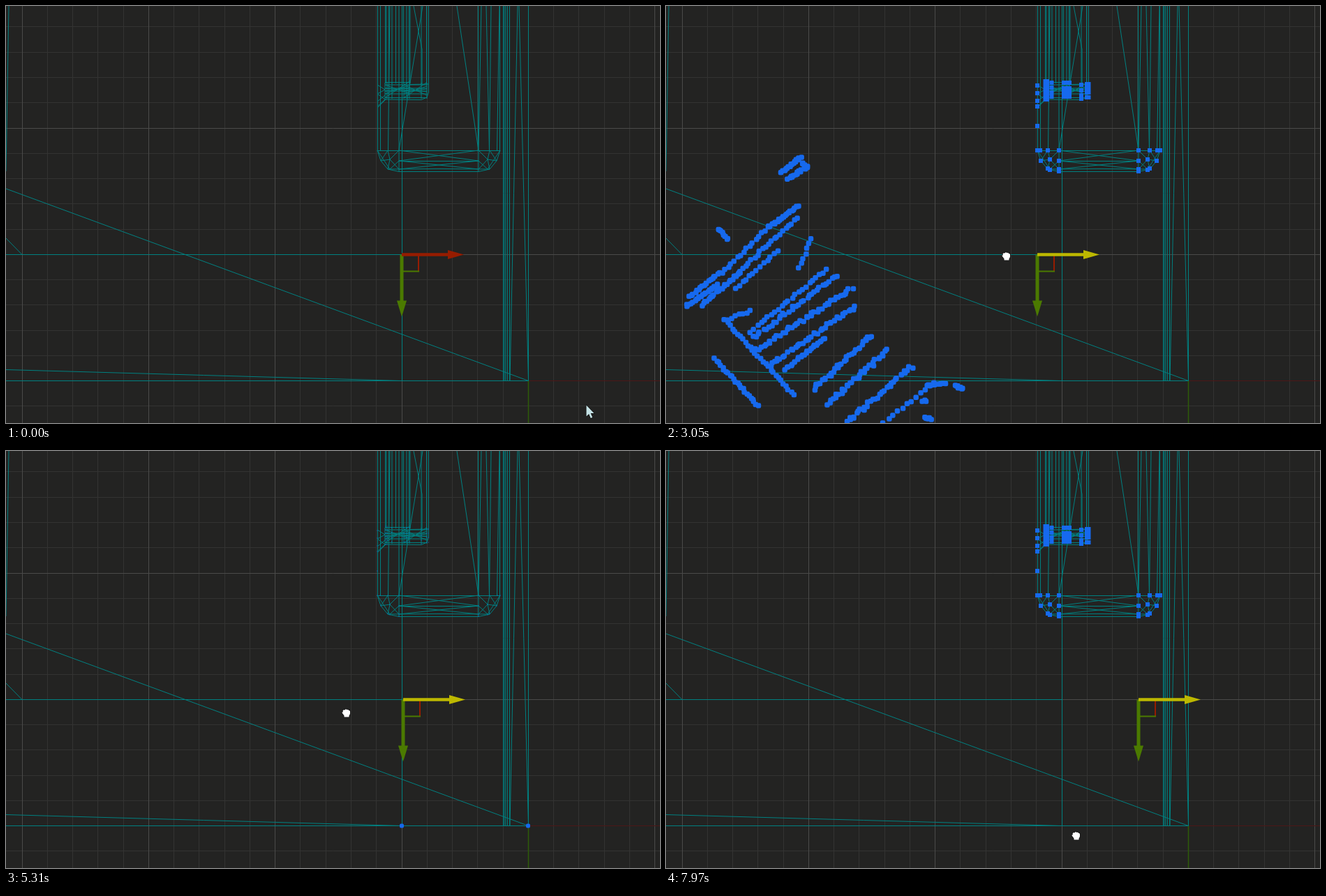
These frames come from a looping animation (937 by 598 pixels, 8 s). An HTML page with a canvas:

```html
<!DOCTYPE html>
<html lang="en">
<head>
<meta charset="utf-8">
<title>Vertex snapping</title>
<style>
  html, body { margin: 0; width: 100%; height: 100%; overflow: hidden; background: #232322; }
  canvas { display: block; }
</style>
</head>
<body>
<canvas id="stage" width="937" height="598"></canvas>
<script>
const ctx = document.getElementById('stage').getContext('2d');
const LOOP = 8000, STEP = 80, SHRINK = 270;
const TEAL = '#008080', BLUE = '#1669ee';
const RED = '#961c00', GREEN = '#4b7a00', YELLOW = '#bdb800';

// Pointer keys: time, x, y, and 1 to hold until the next key
const pointerKeys = [
  [0, 831, 572, 1], [70, 800, 530], [310, 634, 347, 1], [470, 634, 351], [630, 634, 361, 1],
  [850, 633, 354, 1], [1250, 636, 354, 1], [1950, 635, 354, 1], [2190, 630, 354], [2970, 495, 357],
  [3050, 487, 358], [3350, 437, 360, 1], [3510, 520, 362], [3670, 580, 363], [3830, 612, 367],
  [4290, 535, 377], [4370, 530, 377, 1], [4530, 526, 376], [4850, 503, 374, 1], [4990, 498, 374],
  [5310, 487, 375], [5470, 487, 376, 1], [5690, 490, 377], [5930, 494, 377], [6090, 491, 378, 1],
  [6250, 488, 378], [6550, 486, 378], [7030, 523, 380], [7110, 528, 390], [7500, 592, 560],
  [7700, 598, 588], [7890, 587, 552], [7970, 587, 551, 1], [LOOP, 587, 551]
];

// Snapped x of the gizmo
const gizmoKeys = [
  [0, 567], [3050, 532], [3510, 563], [3590, 580], [3670, 605], [3790, 677], [3990, 605],
  [4210, 595], [4610, 580], [4770, 575], [4990, 569], [5470, 574], [6250, 569], [6900, 575],
  [7110, 580], [7190, 605], [7270, 677]
];

// Vertex groups pop in, then shrink away: [on, start of shrinking]
const visible = {
  cloud: [[2430, 3430], [5470, 5830]],
  shape: [[3050, 5080], [5690, 6400], [6870, 9000]],
  corner: [[4990, 5270], [6330, 6780]]
};

let seed = 11;
const random = () => (seed = (seed * 16807) % 2147483647) / 2147483647;

// Rows of points: x1, y1, x2, y2, count
const streaks = [
  [166, 239, 193, 217, 17], [175, 248, 203, 229, 18], [196, 226, 201, 234, 6],
  [34, 416, 76, 383, 18], [29, 431, 74, 400, 20], [51, 429, 106, 382, 22],
  [80, 383, 142, 322, 15], [98, 387, 188, 304, 23], [146, 318, 190, 286, 24],
  [100, 405, 160, 352, 13], [190, 375, 209, 335, 7], [74, 320, 89, 335, 9],
  [82, 451, 121, 437, 8], [121, 467, 230, 378, 23], [124, 476, 246, 386, 34],
  [130, 493, 266, 405, 42], [149, 514, 270, 432, 42], [171, 521, 228, 476, 24],
  [88, 455, 183, 557, 27], [70, 506, 132, 573, 24], [211, 549, 296, 472, 34],
  [232, 571, 317, 494, 32], [260, 597, 352, 517, 34], [312, 597, 385, 540, 12],
  [374, 544, 400, 542, 10], [416, 545, 425, 548, 8], [371, 590, 379, 592, 7],
  [366, 566, 373, 566, 3]
];
const cloud = streaks.flatMap(([x1, y1, x2, y2, n]) => Array.from({ length: n }, (_, i) => {
  const u = i / (n - 1), spread = n > 30 ? 5 : 3;
  return [x1 + (x2 - x1) * u + (random() - .5) * spread, y1 + (y2 - y1) * u + (random() - .5) * spread];
}));

const grid = (xs, ys) => xs.flatMap(x => ys.map(y => [x, y]));
const mirror = ([x, y]) => [1240 - x, y];
const bowl = [[532, 207], [536, 207], [547, 207], [563, 207], [537, 222], [550, 220], [563, 222],
  [547, 233], [550, 235], [563, 234], [563, 237]];
const shape = [
  ...grid([532], [114, 125, 136, 144, 172]),
  ...grid([543.5, 546], [108, 113, 118, 123, 128, 134]),
  ...grid([552.5], [110, 117, 124, 130]),
  ...grid([570, 574, 578], [110, 118, 124, 130]),
  ...grid([595], [113, 121, 128, 133]),
  ...grid([603, 605.5], [112, 118, 124, 131]),
  ...bowl, ...bowl.map(mirror)
];
const corner = [[567, 537.5], [748, 537.5]];

const mesh = new Path2D();
function line(...points) {
  points.forEach(([x, y], i) => i ? mesh.lineTo(x, y) : mesh.moveTo(x, y));
}
const verticals = (xs, y) => xs.forEach(x => line([x, 0], [x, y]));

line([4, 0], [0, 237]);
line([0, 262], [748.5, 537.5]);
line([0, 333], [23, 356.5], [0, 356.5]);
line([23, 356.5], [567, 356.5]);
line([0, 521.5], [567, 537.5]);
line([0, 537.5], [748.5, 537.5]);
line([567.5, 0], [567.5, 537.5]);
line([733, 0], [722, 537.5]);
line([735, 0], [748.5, 537.5]);
verticals([712.5, 714, 716, 718.5, 721.5, 748.5], 537.5);
verticals([532.5, 536.5, 563, 676.5, 707.5], 207);
verticals([543.5, 545, 548.5, 553, 558.5, 569.5, 574, 577.5, 579], 111);
verticals([595, 602.5, 605.5], 113);
line([550, 0], [547.5, 207]);
line([681, 0], [677, 207]);
line([688, 0], [692.5, 207]);
line([695, 0], [692.5, 207]);
line([707, 0], [703.5, 207]);
line([646, 0], [677, 207]);
line([597, 0], [563, 207]);
line([584, 0], [596, 62], [596, 112]);

// Bowl: one corner, mirrored, with a braced middle
for (const flip of [p => p, mirror]) {
  const side = (...points) => line(...points.map(flip));
  side([532, 207], [537, 222], [547, 234], [563, 237.5], [620, 237.5]);
  side([532, 207.5], [620, 207.5]);
  side([563, 207], [563, 237]);
  side([547, 207], [537, 222], [550, 220], [563, 207]);
  side([532, 207], [550, 234], [563, 222]);
  side([547, 207], [550, 220], [547, 234], [620, 233.5]);
  side([550, 220], [563, 234]);
  side([563, 222.5], [620, 222.5]);
}
for (const [a, b] of [[207, 222], [222, 207], [222, 234], [234, 222]]) line([563, a], [677, b]);

// Small lip above the bowl
line([543, 109.5], [579, 109.5]);
line([532, 113], [543, 120], [532, 126], [543, 134], [595, 134.5], [603, 131], [605.5, 124], [605.5, 112], [579, 112.5]);
line([532, 137], [543, 128]);
line([532, 144], [543, 134]);
line([532, 146], [545, 133]);
for (const y of [113, 118, 122, 126, 131.5]) {
  line([543, y], [603, y]);
  line([543, y], [579, 239 - y]);
  line([570, y], [603, 241 - y]);
}
for (const x of [543, 546, 553, 570, 574, 578, 595, 603]) line([x, 110], [x, 133]);

function stroke(color, width, ...points) {
  ctx.strokeStyle = color;
  ctx.lineWidth = width;
  ctx.beginPath();
  points.forEach(([x, y]) => ctx.lineTo(x, y));
  ctx.stroke();
}

function fill(color, ...points) {
  ctx.fillStyle = color;
  ctx.beginPath();
  points.forEach(([x, y]) => ctx.lineTo(x, y));
  ctx.fill();
}

function drawGrid() {
  const cell = 36.27;
  const across = (color, i) => {
    const x = Math.floor(23 + i * cell) + .5, y = Math.floor(175 + (i - 5) * cell) + .5;
    stroke(color, 1, [x, 0], [x, 598]);
    stroke(color, 1, [0, y], [937, y]);
  };
  for (let i = 0; i < 26; i++) if (i % 5) across('#333332', i);
  for (let i = 0; i < 26; i += 5) across('#4a4a49', i);
  stroke('#4d1717', 1, [748, 537.5], [937, 537.5]);
  stroke('#2d5c08', 1.5, [748.5, 537], [748.5, 598]);
}

function drawVertices(points, spans, t, full, round) {
  const span = spans.find(([on, off]) => t >= on && t < off + SHRINK);
  if (!span) return;
  const size = full * Math.min(1, 1 - (t - span[1]) / SHRINK);
  if (size < .4) return;
  ctx.fillStyle = BLUE;
  ctx.beginPath();
  for (const [x, y] of points) {
    ctx.roundRect(x - size / 2, y - size / 2, size, size, round ? size * .3 : 0);
  }
  ctx.fill();
}

function drawGizmo(x, dragging) {
  const y = 356.5, main = dragging ? YELLOW : RED;
  stroke(RED, 2, [x + 24, y], [x + 24, y + 24]);
  stroke(GREEN, 2, [x, y + 24], [x + 25, y + 24]);
  stroke(GREEN, 5, [x, y], [x, y + 68]);
  fill(GREEN, [x - 7, y + 66], [x + 7, y + 66], [x, y + 89]);
  stroke(main, 4.5, [x, y], [x + 68, y]);
  fill(main, [x + 66, y - 6.5], [x + 66, y + 6.5], [x + 89, y]);
}

const cursors = {
  arrow: new Path2D('M0 0V16L3.6 12.6L6.2 18.6L8.8 17.5L6.2 11.6H11Z'),
  move: new Path2D('M0-10.5L4-6H1.5V-1.5H6V-4L10.5 0L6 4V1.5H1.5V6H4L0 10.5L-4 6H-1.5V1.5H-6V4L-10.5 0L-6-4V-1.5H-1.5V-6H-4Z'),
  hand: new Path2D('M-5-3Q-4-5-2-4Q-1-6 1-4.5Q3-5.5 3.5-3.5Q6-4 5.5-1V1Q5 3 4 4V6H-3V4L-6 0Q-6-2-4.5-1Z')
};

function drawCursor(kind, x, y) {
  ctx.save();
  ctx.translate(x + .5, y + .5);
  ctx.lineJoin = 'round';
  ctx.lineWidth = 1.6;
  ctx.strokeStyle = '#111';
  ctx.stroke(cursors[kind]);
  ctx.fillStyle = kind === 'arrow' ? '#c5e2e5' : '#fff';
  ctx.fill(cursors[kind]);
  ctx.restore();
}

function pointerAt(t) {
  const i = pointerKeys.findLastIndex(key => key[0] <= t);
  const [t0, x0, y0, hold] = pointerKeys[i], next = pointerKeys[i + 1];
  if (hold || !next) return [x0, y0];
  const u = Math.floor((t - t0) / STEP) * STEP / (next[0] - t0);
  return [x0 + (next[1] - x0) * u, y0 + (next[2] - y0) * u];
}

function draw(t) {
  ctx.fillStyle = '#232322';
  ctx.fillRect(0, 0, 937, 598);
  drawGrid();
  ctx.strokeStyle = TEAL;
  ctx.lineWidth = 1;
  ctx.stroke(mesh);
  drawVertices(cloud, visible.cloud, t, 7.5, true);
  drawVertices(shape, visible.shape, t, 6);
  drawVertices(corner, visible.corner, t, 7, true);
  drawGizmo(gizmoKeys.findLast(key => key[0] <= t)[1], t >= 2190);
  drawCursor(t < 310 ? 'arrow' : t < 1950 ? 'move' : 'hand', ...pointerAt(t));
}

const start = performance.now();
function frame() {
  draw((performance.now() - start) % LOOP);
  requestAnimationFrame(frame);
}
frame();
</script>
</body>
</html>
```
